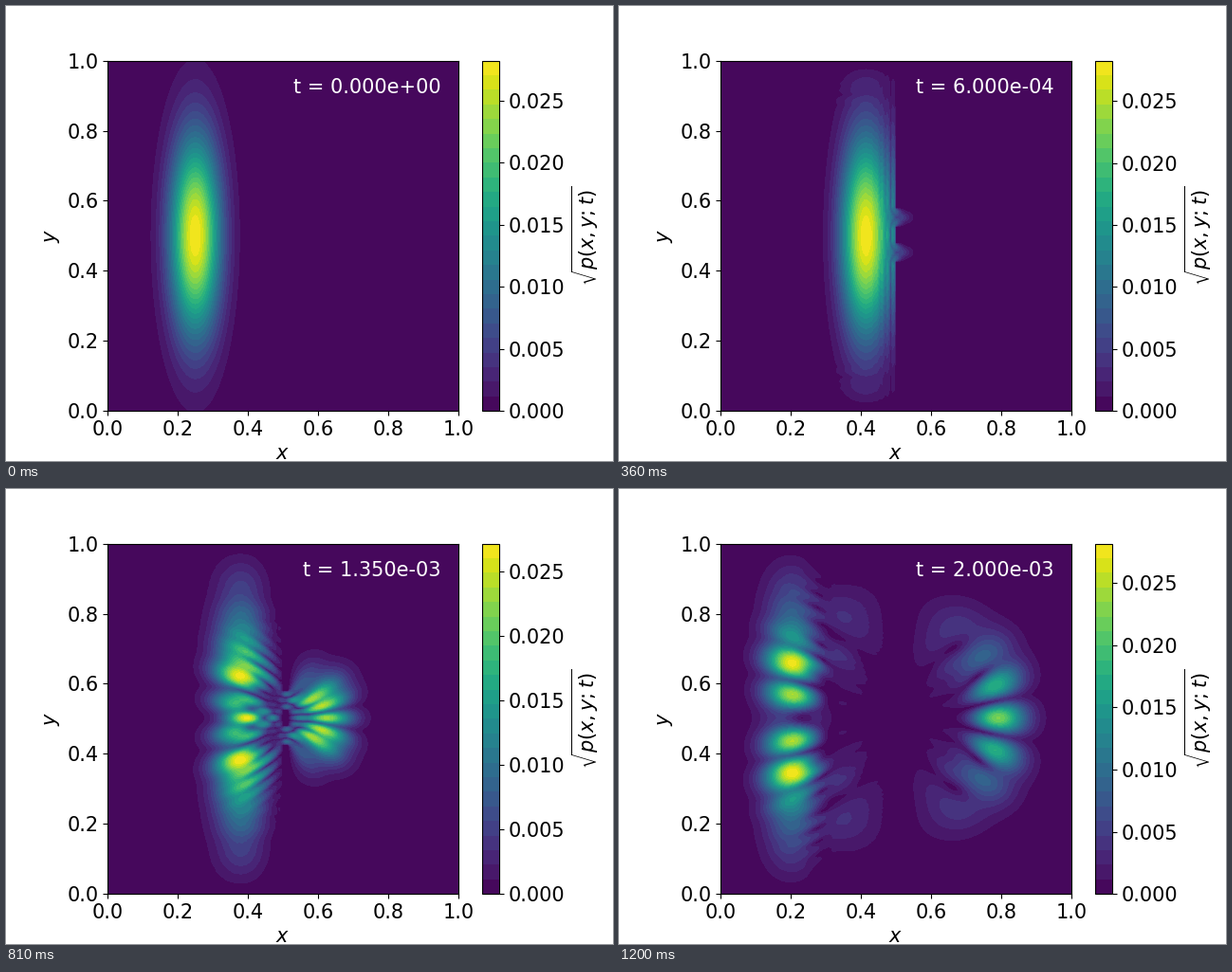
A matplotlib script for the animation above (1230 ms loop, 640 by 480 pixels).

```python
import numpy as np
import matplotlib.pyplot as plt
from matplotlib.animation import FuncAnimation
from matplotlib.ticker import AutoLocator
from numpy.polynomial.chebyshev import chebinterpolate

plt.rcParams["font.size"] = 15

FRAMES = 41
INTERVAL = 30
DT = 2.5e-5
STEPS_PER_FRAME = 2
N = 201
LEVELS = 25

axis = np.linspace(0, 1, N)
H = axis[1]
X, Y = np.meshgrid(axis, axis)


def free_cells():
    """1 where the wave may move, 0 on the border and the slitted wall."""
    free = np.zeros((N, N))
    free[1:-1, 1:-1] = 1
    wall = slice(100, 104)
    free[:, wall] = 0
    for start in (86, 106):
        free[start:start + 10, wall] = 1
    return free


def start_packet():
    psi = np.exp(-(X - 0.25) ** 2 / (2 * 0.05 ** 2)
                 - (Y - 0.5) ** 2 / (2 * 0.2 ** 2) + 200j * X)
    return psi / np.sqrt(np.sum(np.abs(psi) ** 2))


def cayley(z):
    """Crank-Nicolson factor for a scaled neighbour-sum eigenvalue z."""
    k = 2 * DT / H ** 2 * (1 - z)
    return ((1 - 1j * k) / (1 + 1j * k)) ** STEPS_PER_FRAME


def neighbour_mean(u, free):
    out = np.zeros_like(u)
    out[1:-1, 1:-1] = (u[:-2, 1:-1] + u[2:, 1:-1]
                       + u[1:-1, :-2] + u[1:-1, 2:]) / 4
    return out * free


def advance(u, coefs, free):
    """Apply the time step as a Chebyshev series of the neighbour mean."""
    prev, cur = u, neighbour_mean(u, free)
    total = coefs[0] * prev + coefs[1] * cur
    for c in coefs[2:]:
        prev, cur = cur, 2 * neighbour_mean(cur, free) - prev
        total += c * cur
    return total


def simulate():
    free = free_cells()
    coefs = chebinterpolate(cayley, 36)
    psi = start_packet()
    fields = [np.abs(psi)]
    psi = psi * free
    for _ in range(FRAMES - 1):
        psi = advance(psi, coefs, free)
        fields.append(np.abs(psi))
    return fields


fields = simulate()
fig = plt.figure(figsize=(6.4, 4.8), dpi=100)


def draw(i):
    fig.clear()
    ax = fig.add_subplot()
    field = fields[i]
    filled = ax.contourf(X, Y, field, levels=np.linspace(0, field.max(), LEVELS))
    ax.set_aspect("equal")
    ax.set_xlabel("$x$")
    ax.set_ylabel("$y$")
    time = i * STEPS_PER_FRAME * DT
    ax.text(0.95, 0.95, f"t = {time:.3e}", color="white", ha="right", va="top")
    fig.colorbar(filled, ax=ax, ticks=AutoLocator(), label=r"$\sqrt{p(x,y;t)}$")


anim = FuncAnimation(fig, draw, frames=FRAMES, interval=INTERVAL,
                     init_func=lambda: None, repeat=True, repeat_delay=0)
plt.show()
```
